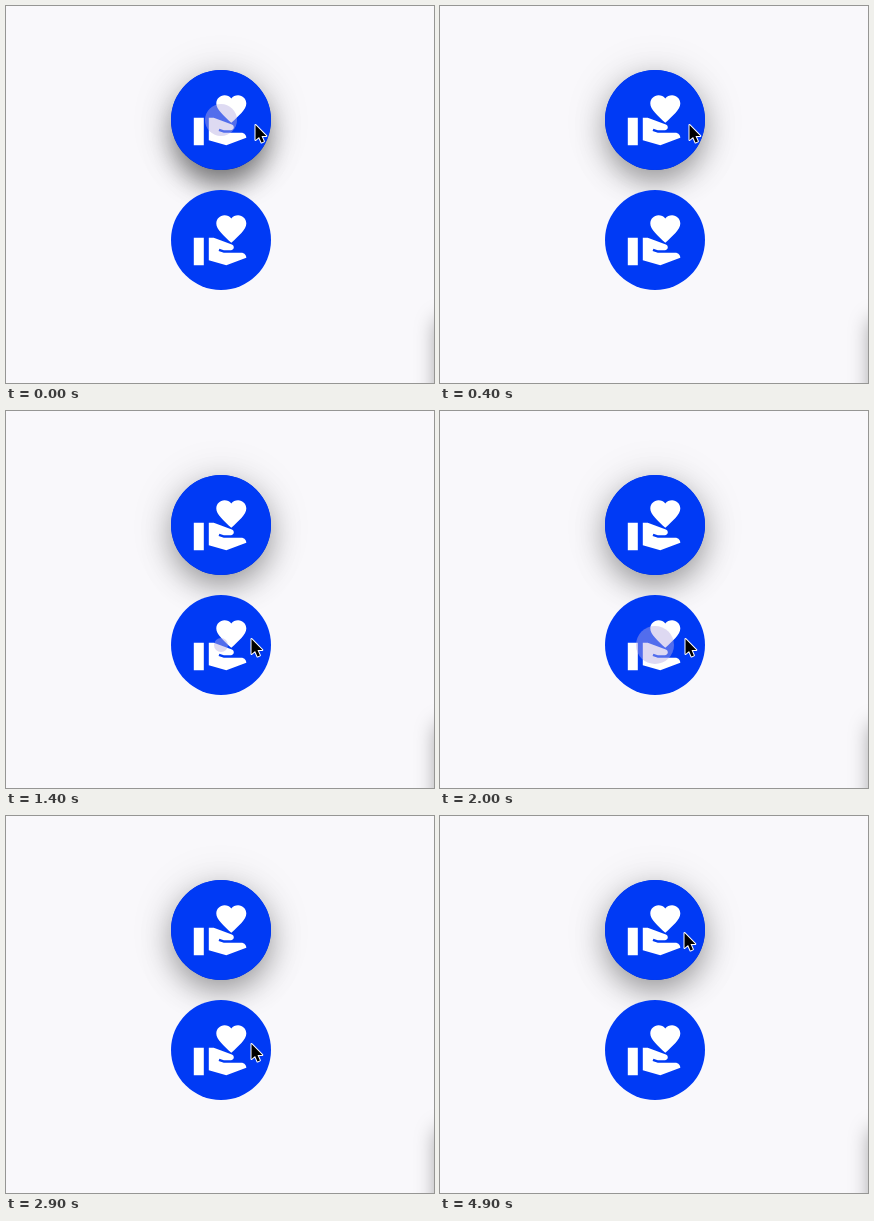
Write an HTML page with a canvas that moves like this. It is 428 px wide and 377 px high and loops after 6000 ms.

```html
<!DOCTYPE html>
<html lang="en">
<head>
<meta charset="utf-8">
<title>Ripple buttons</title>
<style>
html, body { margin: 0; width: 100%; height: 100%; overflow: hidden; background: #f9f8fb; }
canvas { display: block; }
</style>
</head>
<body>
<canvas id="stage" width="428" height="377"></canvas>
<script>
const ctx = document.getElementById('stage').getContext('2d');
const LOOP = 6000, STEP = 100;
const PAPER = '#f9f8fb', BLUE = '#003af5';
const CX = 215, TOP = 114, LOW = 234, R = 50;

const icon = new Path2D(
  'M1 11h4v11H1z' +
  'M16 3.25C16.65 2.49 17.66 2 18.7 2 20.55 2 22 3.45 22 5.3c0 2.27-2.91 4.9-6 7.7' +
  '-3.09-2.81-6-5.44-6-7.7C10 3.45 11.45 2 13.3 2c1.04 0 2.05.49 2.7 1.25z' +
  'M20 17h-7l-2.09-.73.33-.94L13 16h2.82c.65 0 1.18-.53 1.18-1.18 0-.49-.31-.93-.77-1.11' +
  'L8.97 11H7v9.02L14 22l8.01-3c-.01-1.1-.9-2-2.01-2z');
const arrow = new Path2D('M0 0V15L3.6 12L6 17.5L8.4 16.4L6 11H10.8Z');

const ramp = (t, from, to) => Math.min(1, Math.max(0, (t - from) / (to - from)));
const smooth = k => k * k * (3 - 2 * k);

function disc(x, y, r, fill) {
  ctx.beginPath();
  ctx.arc(x, y, r, 0, Math.PI * 2);
  ctx.fillStyle = fill;
  ctx.fill();
}

function shadow(dy, r, blur, alpha) {
  ctx.save();
  ctx.shadowColor = `rgba(0,0,0,${alpha})`;
  ctx.shadowBlur = blur;
  ctx.shadowOffsetY = dy;
  disc(CX, TOP, r, BLUE);
  ctx.restore();
}

// Soft edge of a panel that sits just off the stage.
function edgeShadow() {
  ctx.save();
  ctx.shadowColor = 'rgba(0,0,0,.4)';
  ctx.shadowBlur = 20;
  ctx.fillStyle = PAPER;
  ctx.fillRect(431, 314, 80, 120);
  ctx.restore();
}

// Grows slowly while pressed, then spreads and fades after release.
function ripple(t, y, press, release, fade) {
  const k = ramp(t, release, release + fade);
  if (t < press || k === 1) return;
  const held = 3 + (Math.min(t, release) - press) / 50;
  const r = held + (R - held) * (1 - (1 - k) ** 1.5);
  disc(CX, y, r, `rgba(182,172,226,${0.45 * (1 - k)})`);
}

function button(y) {
  disc(CX, y, R, BLUE);
  ctx.save();
  ctx.translate(CX - 29.7, y - 29.7);
  ctx.scale(2.5, 2.5);
  ctx.fillStyle = '#fff';
  ctx.fill(icon);
  ctx.restore();
}

function cursor(t) {
  const down = smooth(ramp(t, 700, 900));
  const up = smooth(ramp(t, 3800, 4200));
  const back = smooth(ramp(t, 4200, 4400));
  const jump = t >= 4900 ? 1 : 0;
  ctx.save();
  ctx.translate(
    249.5 - 4 * down - 3.5 * up + 8 * back - 5.5 * jump,
    119 + 109 * down - 111 * up + 80 * back - 80 * jump);
  ctx.lineWidth = 2;
  ctx.lineJoin = 'round';
  ctx.strokeStyle = '#fff';
  ctx.stroke(arrow);
  ctx.fillStyle = '#000';
  ctx.fill(arrow);
  ctx.restore();
}

function draw(t) {
  ctx.fillStyle = PAPER;
  ctx.fillRect(0, 0, 428, 377);
  edgeShadow();
  shadow(2, R, 46, 0.12);
  shadow(12, R - 1, 30, 0.34);
  const lift = (1 - ramp(t, 0, 700)) ** 3;
  if (lift > 0) shadow(22, 43, 26, 0.28 * lift);
  button(TOP);
  button(LOW);
  ripple(t, TOP, -650, 0, 400);
  ripple(t, LOW, 1200, 2000, 600);
  cursor(t);
}

const start = performance.now();
function tick() {
  const t = (performance.now() - start) % LOOP;
  draw(Math.floor(t / STEP) * STEP);
  requestAnimationFrame(tick);
}
tick();
</script>
</body>
</html>
```
